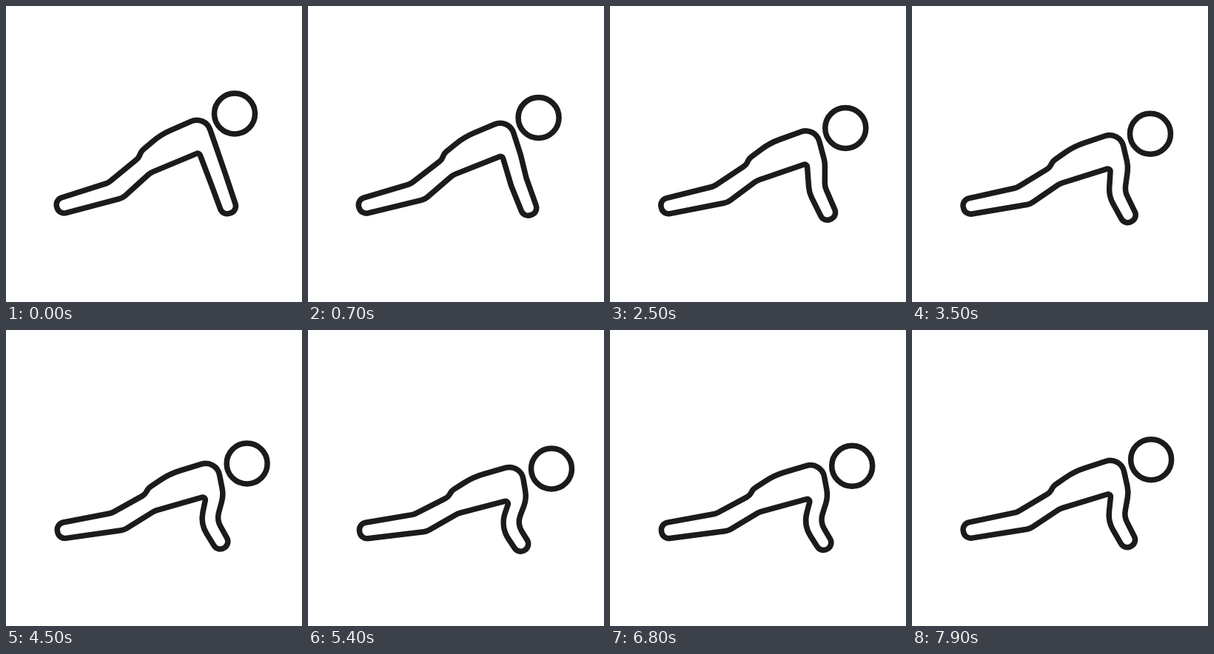
Recreate the animation shown at these times as an HTML page with a canvas. Size 400 px wide and 400 px high, loop 8 s.

```html
<!DOCTYPE html>
<html lang="en">
<head>
<meta charset="utf-8">
<title>Push-up</title>
<style>
html, body { margin: 0; width: 100%; height: 100%; overflow: hidden; background: #fff; }
canvas { display: block; width: 400px; height: 400px; }
</style>
</head>
<body>
<canvas id="stage" width="400" height="400"></canvas>
<script>
const ctx = document.getElementById('stage').getContext('2d');
const LOOP = 8000, STEP = 100, LOWEST = 5855, LOW_POSE = 5400;
const FOOT = { x: 66, y: 268 }, TURN = 0.14, SLIDE = 1.5, SAG = 4.5;

// A corner of the outline: place when raised, rounding, shift when lowered
const corner = (x, y, r, dx, dy) => ({ x, y, r, dx, dy });

// The legs turn about the foot; the torso also sags
const leg = (x, y, r, sag = 0) =>
  corner(x, y, r, SLIDE + TURN * (FOOT.y - y), TURN * (x - FOOT.x) + sag);
const torso = (x, y, r) => leg(x, y, r, SAG);

const BODY = [
  leg(65.5, 262, 10),
  leg(138, 239, 20),
  torso(179, 205.5, 14),
  torso(183, 196, 14),
  torso(209, 174, 100),
  torso(269, 147.5, 19),
  corner(286, 196.6, 40, 9.5, 31.5),
  corner(297, 228.5, 25, -14.5, 33.5),
  corner(313, 276.5, 9.8, -12, 15),
  corner(293, 283.4, 9.8, -8, 20),
  corner(277, 240, 40, -17, 26),
  torso(261, 198, 3.5),
  torso(195, 225.5, 25),
  leg(157.5, 259.5, 20),
  leg(72, 282, 10)
];
const HEAD = corner(309, 145.5, 27.5, 20, 42);

const pose = (c, k) => ({ x: c.x + c.dx * k, y: c.y + c.dy * k, r: c.r });

function roundedPath(pts) {
  const first = pts[0], last = pts[pts.length - 1];
  ctx.beginPath();
  ctx.moveTo((first.x + last.x) / 2, (first.y + last.y) / 2);
  pts.forEach((p, i) => {
    const next = pts[(i + 1) % pts.length];
    ctx.arcTo(p.x, p.y, next.x, next.y, p.r);
  });
  ctx.closePath();
}

function draw(time) {
  const t = Math.floor((time % LOOP) / STEP) * STEP;
  const k = (LOWEST - Math.abs(t - LOWEST)) / LOW_POSE;
  ctx.fillStyle = '#fff';
  ctx.fillRect(0, 0, 400, 400);
  ctx.strokeStyle = '#1c1b1c';
  ctx.lineWidth = 7.5;
  ctx.lineJoin = 'round';
  roundedPath(BODY.map(c => pose(c, k)));
  ctx.stroke();
  const head = pose(HEAD, k);
  ctx.beginPath();
  ctx.arc(head.x, head.y, head.r, 0, Math.PI * 2);
  ctx.stroke();
}

const start = performance.now();
function tick() {
  draw(performance.now() - start);
  requestAnimationFrame(tick);
}
tick();
</script>
</body>
</html>
```
